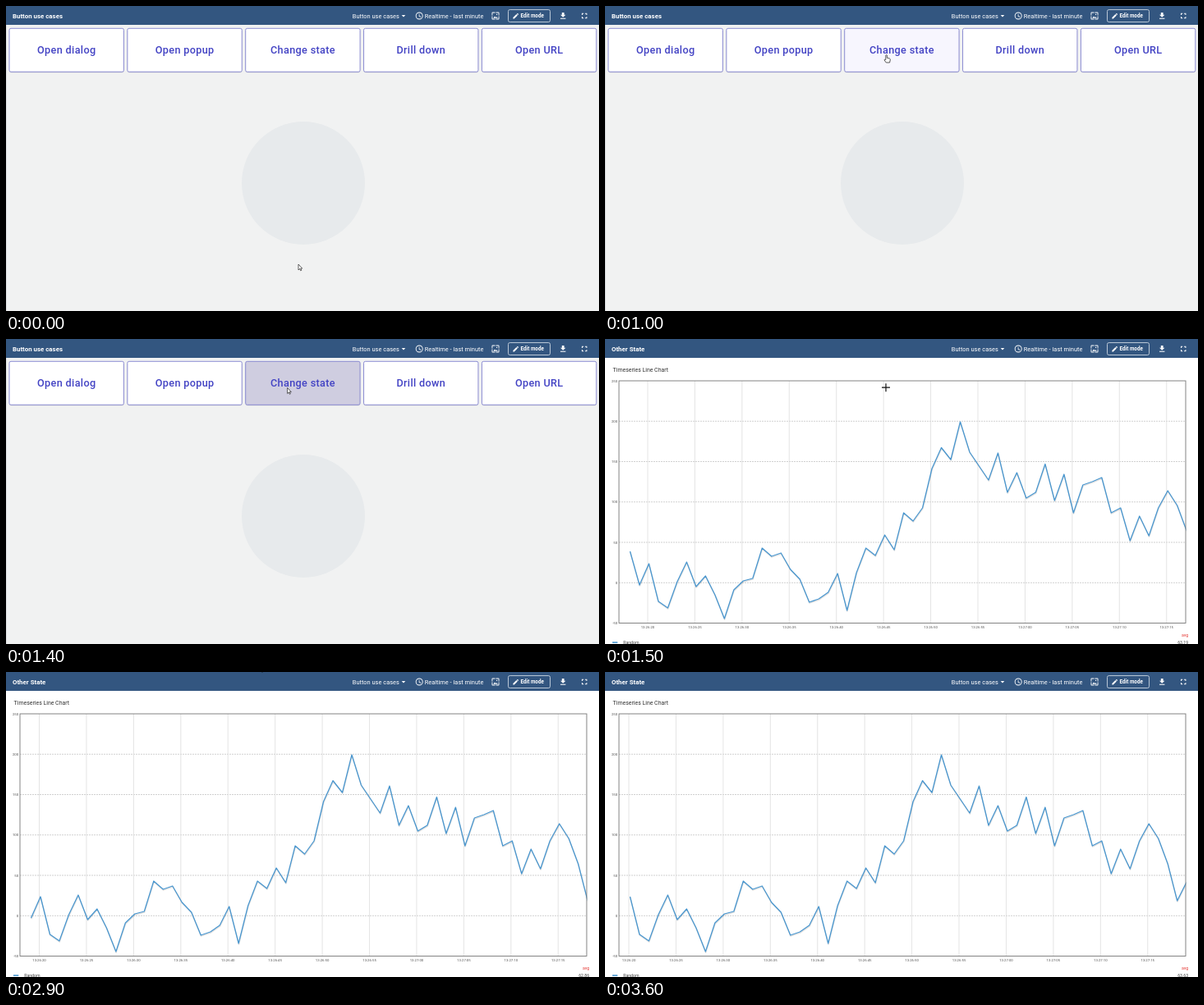
Animation of 722 by 372 pixels, one loop 4500 ms. Source, as an HTML page:

```html
<!DOCTYPE html>
<html lang="en">
<head>
<meta charset="utf-8">
<title>Button use cases</title>
<style>
  html, body { margin: 0; width: 722px; height: 372px; overflow: hidden; background: #f1f2f2; }
  svg { display: block; font-family: Roboto, sans-serif; }
  .bar { fill: #fff; }
  .big { font-size: 12.65px; font-weight: 500; letter-spacing: .35px; fill: #4343c4; text-anchor: middle; }
  .tick { font-size: 4.3px; fill: #545454; }
  .mid { text-anchor: middle; }
  .end { text-anchor: end; }
  .legend { font-size: 5.2px; fill: #444; }
</style>
</head>
<body>
<svg id="stage" width="722" height="372" viewBox="0 0 722 372"></svg>
<script>
const LOOP = 4500, STEP = 100;
const stage = document.getElementById('stage');

function add(parent, tag, attrs, text) {
  const el = document.createElementNS('http://www.w3.org/2000/svg', tag);
  for (const key in attrs) el.setAttribute(key, attrs[key]);
  if (text !== undefined) el.textContent = text;
  parent.append(el);
  return el;
}
const group = (parent, attrs = {}) => add(parent, 'g', attrs);
const label = (parent, x, y, text, attrs = {}) => add(parent, 'text', { x, y, ...attrs }, text);
const line = (parent, x1, y1, x2, y2, attrs) => add(parent, 'line', { x1, y1, x2, y2, ...attrs });
const show = (el, on) => el.setAttribute('visibility', on ? 'inherit' : 'hidden');

// Dashboard with buttons
const home = group(stage);
add(home, 'rect', { width: 722, height: 372, fill: '#f1f2f2' });
add(home, 'rect', { y: 23, width: 1, height: 349, fill: '#dcdfe1' });
add(home, 'circle', { cx: 362, cy: 216, r: 75, fill: '#e7eaec' });
const cards = ['Open dialog', 'Open popup', 'Change state', 'Drill down', 'Open URL'].map((text, i) => {
  const x = 4 + i * 143.85;
  add(home, 'rect', { x, y: 28.2, width: 139.5, height: 53.4, rx: 2.5, fill: '#000', opacity: .1 });
  const card = add(home, 'rect', { x, y: 27.3, width: 139.4, height: 53, rx: 2, fill: '#fff', stroke: '#7f80cf', 'stroke-width': .9 });
  label(home, x + 69.8, 58, text, { class: 'big' });
  return card;
});

// Chart
const LEFT = 17, RIGHT = 707, TOP = 51, BOTTOM = 346.5;
const X0 = 30.5, DX = 11.486, BLUE = '#4896cf';
const samples = [
  259, 300, 274, 320, 328, 296, 272, 302, 289, 312, 341, 306, 295, 292, 255, 265,
  261, 281, 293, 321, 317, 309, 286, 331, 285, 255, 264, 239, 257, 212, 222, 206,
  158, 132.5, 147, 101, 138, 155, 172, 139, 187, 163, 194, 187, 152.5, 197, 165, 212,
  178, 174, 169, 212, 206, 246, 216, 240, 206, 185, 203, 234, 279, 256
];
const averages = ['63.19', '62.86', '63.63'];

const chart = group(stage);
add(chart, 'rect', { width: 722, height: 372, fill: '#fff' });
label(chart, 9.6, 40.3, 'Timeseries Line Chart', { 'font-size': 6.95, fill: '#333' });
for (let i = 0; i <= 6; i++) {
  const y = TOP + i * (BOTTOM - TOP) / 6;
  if (i % 6) line(chart, LEFT, y, RIGHT, y, { stroke: '#c4c4c4', 'stroke-width': .8, 'stroke-dasharray': '2 1' });
  label(chart, 15.2, y + 1.6, 250 - 50 * i, { class: 'tick end' });
}
const gridX = group(chart);
for (let i = 0; i < 12; i++) {
  const x = 52 + i * 5 * DX, sec = 20 + i * 5;
  const time = `13:${26 + Math.floor(sec / 60)}:${String(sec % 60).padStart(2, '0')}`;
  line(gridX, x, TOP, x, BOTTOM, { stroke: '#dedede', 'stroke-width': .8 });
  label(gridX, x, 352.6, time, { class: 'tick mid' });
}
const clip = add(chart, 'clipPath', { id: 'plot' });
add(clip, 'rect', { x: LEFT, y: TOP, width: RIGHT - LEFT + .4, height: BOTTOM - TOP });
const plot = group(chart, { 'clip-path': 'url(#plot)', fill: 'none', 'stroke-linejoin': 'round' });
const shade = add(plot, 'polyline', { stroke: '#000', opacity: .13, 'stroke-width': 1.5, transform: 'translate(.3 1.1)' });
const curve = add(plot, 'polyline', { stroke: BLUE, 'stroke-width': 1.25 });
add(chart, 'rect', { x: LEFT, y: TOP, width: RIGHT - LEFT, height: BOTTOM - TOP, fill: 'none', stroke: '#777', 'stroke-width': .9 });
add(chart, 'rect', { x: 9, y: 369.3, width: 6.3, height: 1.6, fill: BLUE });
label(chart, 22.2, 371.8, 'Random', { class: 'legend' });
label(chart, 710.2, 363.4, 'avg', { class: 'legend end', style: 'fill:#e53935' });
const average = label(chart, 710.2, 371.8, '', { class: 'legend end' });

function scrollChart(shift) {
  const points = samples.slice(shift, shift + 60).map((y, i) => `${X0 + i * DX},${y}`).join(' ');
  curve.setAttribute('points', points);
  shade.setAttribute('points', points);
  gridX.setAttribute('transform', `translate(${-shift * DX} 0)`);
  average.textContent = averages[shift];
}

// Toolbar
const bar = group(stage, { class: 'bar' });
add(bar, 'rect', { width: 722, height: 23, fill: '#335680' });
const title = label(bar, 8, 14.8, '', { 'font-size': 7.9, 'font-weight': 700 });
label(bar, 421.8, 14.6, 'Button use cases', { 'font-size': 7.45 });
label(bar, 509.7, 14.6, 'Realtime - last minute', { 'font-size': 7.45 });
add(bar, 'rect', { x: 611.5, y: 4.5, width: 51, height: 15, rx: 2, fill: 'none', stroke: '#c9d4e0', 'stroke-width': .9 });
label(bar, 626.4, 14.3, 'Edit mode', { 'font-size': 6.35, 'font-weight': 700 });

const icon = (x, y, size, d) =>
  add(bar, 'path', { d, transform: `translate(${x} ${y}) scale(${size / 24}) translate(-12 -12)` });
icon(484, 12, 11, 'M7 10l5 5 5-5z');
icon(503.2, 12, 10.8, 'M12 2a10 10 0 1 0 0 20a10 10 0 1 0 0-20zM12 4a8 8 0 1 1 0 16a8 8 0 1 1 0-16zM11 7v6l5.2 3.2.8-1.3-4.5-2.7V7z');
icon(596, 12, 10.8, 'M4 4h7V2H4a2 2 0 0 0-2 2v7h2zM10 13l-4 5h12l-3-4-2 2.7zM17 8.5a1.5 1.5 0 1 0-3 0a1.5 1.5 0 1 0 3 0M20 2h-7v2h7v7h2V4a2 2 0 0 0-2-2zM20 20h-7v2h7a2 2 0 0 0 2-2v-7h-2zM4 13H2v7a2 2 0 0 0 2 2h7v-2H4z');
icon(620.7, 12.2, 8.8, 'M3 17.2V21h3.8L17.8 9.9l-3.7-3.7zM20.7 7a1 1 0 0 0 0-1.4l-2.3-2.3a1 1 0 0 0-1.4 0l-1.9 1.8 3.8 3.8z');
icon(678.2, 12, 11, 'M19 9h-4V3H9v6H5l7 7zM5 18v2h14v-2z');
icon(704.2, 12, 11, 'M7 14H5v5h5v-2H7zM5 10h2V7h3V5H5zM17 17h-3v2h5v-5h-2zM14 5v2h3v3h2V5z');

// Pointers, each drawn around its hot spot
const cursors = {
  arrow: add(stage, 'path', { d: 'M0 0V7L1.6 5.5 2.7 7.8 3.8 7.3 2.7 5.1H4.7Z', fill: '#fff', stroke: '#222', 'stroke-width': .7 }),
  hand: add(stage, 'path', { d: 'M-.8 6V.6Q0-.5.8.6V3.8L4 4.6Q4.9 5 4.7 6.2L4 9.5H-.3L-2.6 6.4Q-2.4 5.1-.8 6Z', fill: '#fff', stroke: '#222', 'stroke-width': .75, 'stroke-linejoin': 'round' }),
  cross: add(stage, 'path', { d: 'M-5 0H5M0-5V5', stroke: '#111', 'stroke-width': 1.2 })
};

// [start ms, pointer, x, y, fill of the middle button]
const moves = [
  [0, 'arrow', 356, 315, '#fff'],
  [500, 'arrow', 355, 303, '#fff'],
  [600, 'arrow', 353, 262, '#fff'],
  [700, 'arrow', 349, 187, '#fff'],
  [800, 'arrow', 345, 112, '#fff'],
  [900, 'hand', 343, 70, '#fbfaff'],
  [1000, 'hand', 342.6, 59.5, '#f7f6fe'],
  [1300, 'hand', 342.6, 59.5, '#e3e1ee'],
  [1400, 'arrow', 342.6, 59.5, '#cfcde0'],
  [1500, 'cross', 342, 59.2, '#fff'],
  [2100, 'cross', 342, 58, '#fff'],
  [2900, 'cross', 312, -4.4, '#fff'],
  [3000, '', 0, 0, '#fff']
];

let last = -1;
function draw(time) {
  const step = Math.floor(time / STEP);
  if (step === last) return;
  last = step;
  const t = step * STEP;
  const [, kind, x, y, fill] = moves.findLast(m => m[0] <= t);
  const opened = t >= 1500;
  show(home, !opened);
  show(chart, opened);
  title.textContent = opened ? 'Other State' : 'Button use cases';
  cards[2].setAttribute('fill', fill);
  scrollChart((t >= 2900) + (t >= 3500));
  for (const name in cursors) {
    show(cursors[name], name === kind);
    cursors[name].setAttribute('transform', `translate(${x} ${y})`);
  }
}

const start = performance.now();
function tick() {
  draw((performance.now() - start) % LOOP);
  requestAnimationFrame(tick);
}
tick();
</script>
</body>
</html>
```
